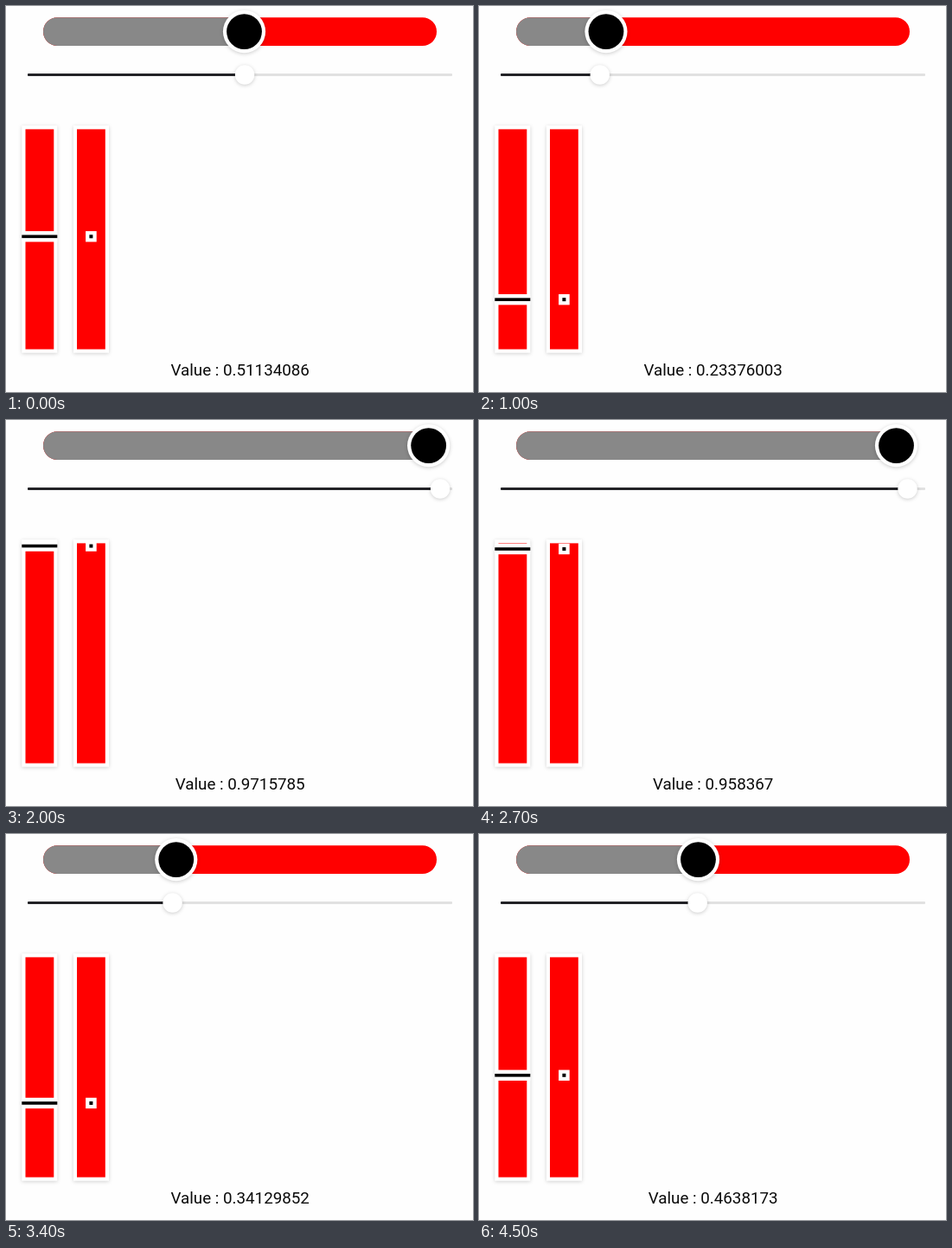
These frames come from a looping animation (540 px wide and 446 px high, 4.6 s). An HTML page:

```html
<!DOCTYPE html>
<html lang="en">
<head>
<meta charset="utf-8">
<title>Sliders</title>
<style>
  html, body { margin: 0; width: 100%; height: 100%; overflow: hidden; background: #fefefe; }
  svg { display: block; width: 540px; height: 446px; }
  text { font: 18.8px Roboto, sans-serif; fill: #0b0b0b; text-anchor: middle; }
  .soft { filter: drop-shadow(0 1px 2px rgba(0, 0, 0, .2)); }
  .panel { fill: #fff; filter: drop-shadow(0 1px 2px rgba(0, 0, 0, .18)); }
  .red { fill: #f00; }
  .white { fill: #fff; }
</style>
</head>
<body>
<svg viewBox="0 0 540 446">
  <clipPath id="pill"><rect x="43" y="13.3" width="455" height="32.6" rx="16.3"/></clipPath>
  <g clip-path="url(#pill)">
    <rect class="red" x="43" y="13" width="455" height="34"/>
    <rect id="wideFill" x="43" y="13" height="34" fill="#888"/>
  </g>
  <g id="wideKnob" class="soft">
    <circle class="white" cy="29.6" r="24.6"/>
    <circle cy="29.6" r="20.4"/>
  </g>

  <rect x="25" y="78" width="491" height="3" rx="1" fill="#e1e1e1"/>
  <rect id="thinFill" x="25" y="78" height="3" rx="1" fill="#222226"/>
  <circle id="thinKnob" class="white soft" cy="79.5" r="11.2"/>

  <rect class="panel" x="18.3" y="138.2" width="41" height="262.5"/>
  <rect class="red" x="22.5" y="142.4" width="32.8" height="254.2"/>
  <g id="lineThumb">
    <rect class="white" x="18.3" y="-6.2" width="41" height="12.4"/>
    <rect x="18.3" y="-1.8" width="41" height="3.6"/>
  </g>

  <rect class="panel" x="78" y="138.2" width="41" height="262.5"/>
  <rect class="red" x="82" y="142.4" width="32.8" height="254.2"/>
  <g id="dotThumb">
    <rect class="white" x="92.1" y="-6.2" width="12.6" height="12.4"/>
    <rect x="96.4" y="-2" width="4" height="4"/>
  </g>

  <text id="label" x="270.7" y="427.3"></text>
</svg>
<script>
const LOOP = 4600, STEP = 100;
// [time in ms, slider value]
const keys = [
  [0, .51134086], [800, .205], [1000, .23376003], [1500, .74641514],
  [2200, 1], [2600, 1], [2700, .958367], [3400, .34129852],
  [3800, .1885771], [4400, .4638173], [4600, .4638173]
];
const slopes = keys.slice(1).map(([t, v], i) => (v - keys[i][1]) / (t - keys[i][0]));
// Harmonic mean of neighbouring slopes keeps the curve free of overshoot.
const tangents = keys.map((_, i) => {
  const a = slopes[i - 1] ?? slopes[i], b = slopes[i] ?? a;
  return a * b > 0 ? 2 * a * b / (a + b) : 0;
});

function valueAt(time) {
  const i = keys.findIndex((_, k) => time < keys[k + 1][0]);
  const [t0, v0] = keys[i], [t1, v1] = keys[i + 1];
  const span = t1 - t0, u = (time - t0) / span, w = 1 - u;
  return w * w * ((1 + 2 * u) * v0 + u * span * tangents[i])
       + u * u * ((3 - 2 * u) * v1 - w * span * tangents[i + 1]);
}

// Shortest decimal that identifies a single-precision number.
function floatText(value) {
  const single = Math.fround(value);
  if (Number.isInteger(single)) return single.toFixed(1);
  for (let digits = 1; ; digits++) {
    const short = Number(single.toPrecision(digits));
    if (Math.fround(short) === single) return String(short);
  }
}

const el = id => document.getElementById(id);
const [wideFill, wideKnob, thinFill, thinKnob, lineThumb, dotThumb, label] =
  ['wideFill', 'wideKnob', 'thinFill', 'thinKnob', 'lineThumb', 'dotThumb', 'label'].map(el);
const move = (node, x, y) => node.setAttribute('transform', `translate(${x} ${y})`);

function draw(value) {
  const wideX = 38.7 + 463.1 * value;
  const thinX = 25 + 491 * value;
  const y = 400.5 - 262.4 * value;
  wideFill.setAttribute('width', wideX - 43);
  move(wideKnob, wideX, 0);
  thinFill.setAttribute('width', thinX - 25);
  thinKnob.setAttribute('cx', thinX);
  move(lineThumb, 0, y);
  move(dotThumb, 0, y);
  label.textContent = 'Value : ' + floatText(value);
}

function frame() {
  const time = performance.now() % LOOP;
  draw(valueAt(Math.floor(time / STEP) * STEP));
  requestAnimationFrame(frame);
}
frame();
</script>
</body>
</html>
```
